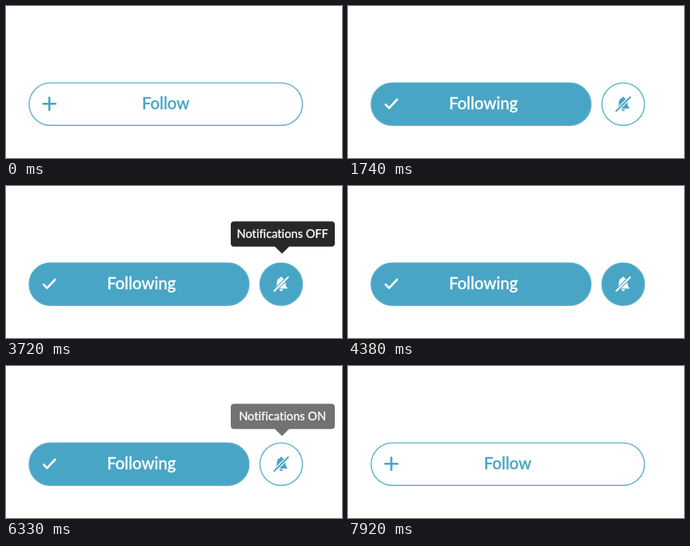
An HTML page for the animation above (9390 ms loop, 420 px wide and 190 px high).

```html
<!DOCTYPE html>
<html lang="en">
<head>
<meta charset="utf-8">
<title>Follow button</title>
<style>
  html, body { margin: 0; width: 100%; height: 100%; overflow: hidden; background: #fff; }
  svg { display: block; width: 420px; height: 190px; }
  text { font-family: Lato, "Open Sans", sans-serif; font-weight: 500; text-anchor: middle; font-variant-ligatures: none; }
  .edge { stroke: #5dafca; stroke-width: 1.4; }
  .line { fill: none; stroke-width: 2.6; stroke-linecap: round; stroke-linejoin: round; }
</style>
</head>
<body>
<svg viewBox="0 0 420 190">
  <rect id="pill" class="edge" x="28.9" y="96.1" height="53.2" rx="26.6"/>
  <path id="icon" class="line"/>
  <text id="label" y="129.3" font-size="20.3" stroke-width=".35"></text>
  <g id="bell">
    <circle id="disc" class="edge" cx="344" cy="122.7" r="26.6"/>
    <path id="shape" d="M344 113.5c-.9 0-1.4.6-1.4 1.4-2.6.7-4 2.8-4 5.6 0 3.6-.6 5-2.2 6.7v1h15.2v-1c-1.6-1.7-2.2-3.1-2.2-6.7 0-2.8-1.4-4.9-4-5.6 0-.8-.5-1.4-1.4-1.4zM341.9 129.3a2.1 2.1 0 0 0 4.2 0z"/>
    <path id="gap" class="line" d="M335.3 131.3L352.7 114" style="stroke-width:4.2"/>
    <path id="slash" class="line" d="M335.3 131.3L352.7 114" style="stroke-width:2"/>
  </g>
  <g id="tip">
    <path fill="#222" d="M285 44H407a4 4 0 0 1 4 4V71.5a4 4 0 0 1-4 4H354L345 84.3 336 75.5H285a4 4 0 0 1-4-4V48a4 4 0 0 1 4-4z"/>
    <text id="tipText" x="345.7" y="65" font-size="14.6" fill="#fff" stroke="#fff" stroke-width=".2"></text>
  </g>
</svg>
<script>
const LOOP = 9390, BLUE = "#48a5c5", WHITE = "#fff";
const PLUS = "M54.2 114.5V129.9M46.5 122.2H61.9", CHECK = "M47 123.2L51.3 127.6 61.3 117";
const el = id => document.getElementById(id);
const set = (id, attrs) => {
  for (const k in attrs) el(id).setAttribute(k, attrs[k]);
};
const ramp = (t, start, length) => Math.min(1, Math.max(0, (t - start) / length));
const easeInOut = p => p * p * (3 - 2 * p);
const easeOut = p => 1 - (1 - p) ** 3;

function draw(t) {
  // The look flips at once; the width and the bell follow.
  const following = t >= 840 && t < 6900;
  const split = easeInOut(ramp(t, 840, 270)) - easeInOut(ramp(t, 6900, 300));
  const front = following ? WHITE : BLUE;
  set("pill", { width: 341.7 - 66.8 * split, fill: following ? BLUE : WHITE });
  set("icon", { d: following ? CHECK : PLUS, stroke: front });
  set("label", { x: 199.6 - 30.3 * split, fill: front, stroke: front });
  el("label").textContent = following ? "Following" : "Follow";

  const filled = t >= 2250 && t < 4860;
  const back = filled ? BLUE : WHITE, ink = filled ? WHITE : BLUE;
  set("bell", { opacity: split });
  set("disc", { fill: back });
  set("shape", { fill: ink });
  set("gap", { stroke: back });
  set("slash", { stroke: ink });

  const second = t >= 4860;
  const shown = second
    ? easeOut(ramp(t, 4840, 110)) * (1 - ramp(t, 6262, 190) * (t >= 6330))
    : easeOut(ramp(t, 2250, 330)) - ramp(t, 3715, 185);
  set("tip", { opacity: shown, transform: `translate(0 ${9 * (1 - shown)})` });
  el("tipText").textContent = "Notifications " + (second ? "ON" : "OFF");
}

function tick() {
  draw(performance.now() % LOOP);
  requestAnimationFrame(tick);
}
tick();
</script>
</body>
</html>
```
